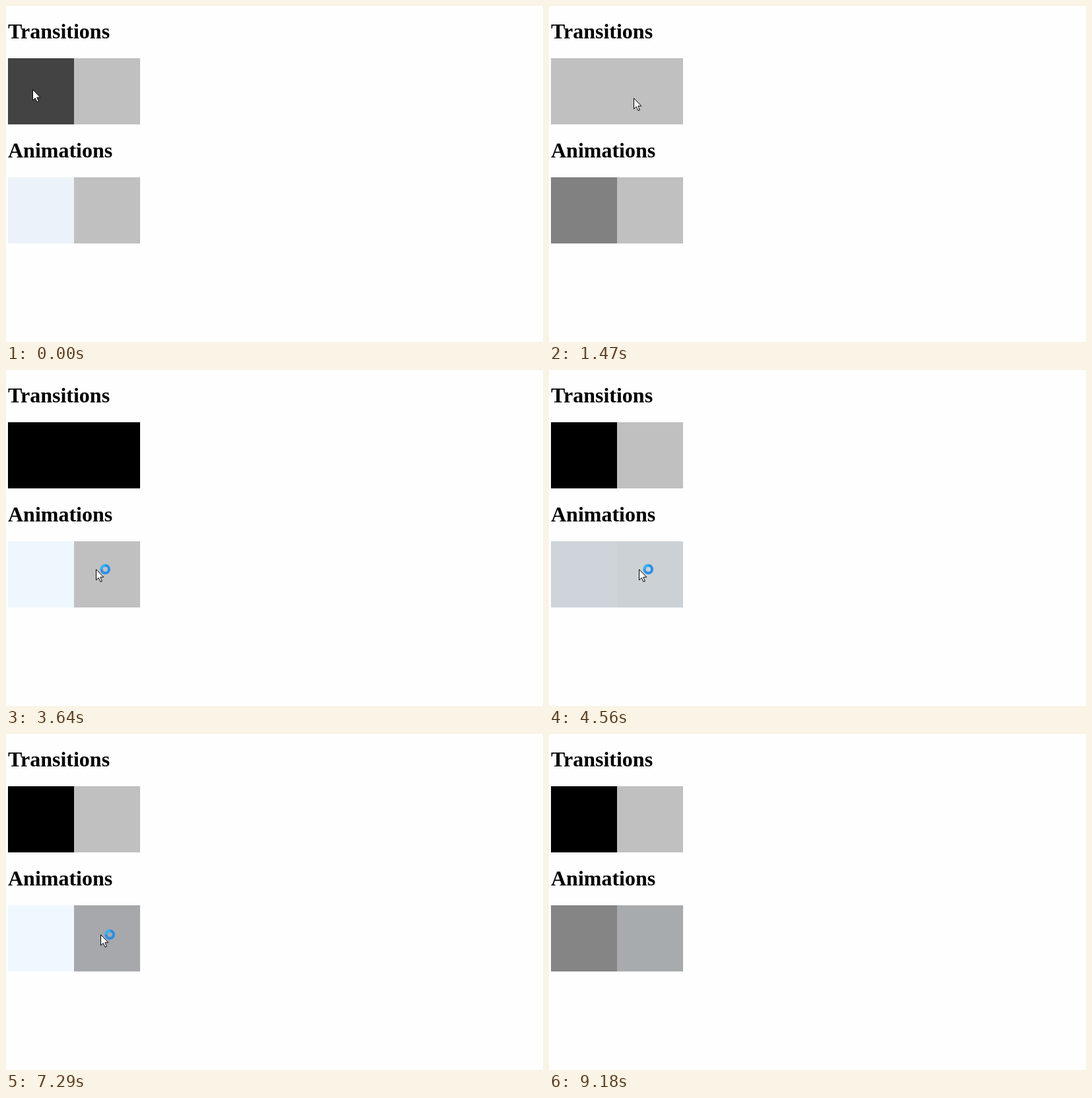
Write an HTML page that moves like this. It is 813 px wide and 508 px high and loops after 9480 ms.

```html
<!DOCTYPE html>
<html lang="en">
<head>
<meta charset="utf-8">
<title>Transitions and animations</title>
<style>
  html, body { margin: 0; width: 100%; height: 100%; overflow: hidden; background: #fefefe; }
  svg { display: block; }
  text { font: bold 32px "Liberation Serif", "Times New Roman", serif; }
</style>
</head>
<body>
<svg width="813" height="508">
  <text x="3" y="49">Transitions</text>
  <rect id="fade1" x="3" y="79" width="100" height="100"/>
  <rect id="fade2" x="103" y="79" width="100" height="100"/>
  <text x="3" y="229">Animations</text>
  <rect id="pulse1" x="3" y="259" width="100" height="100"/>
  <rect id="pulse2" x="103" y="259" width="100" height="100"/>
  <g id="cursor">
    <path d="M.5 .5V16.7L4.2 13.2 7 19.2 9.4 18.2 6.8 12.2H11.8Z" fill="#fff" stroke="#000"/>
    <g id="busy" fill="none" stroke-width="4">
      <circle cx="14.3" cy=".3" r="5.8" stroke="#2a8fe8"/>
      <path d="M8.5 .3A5.8 5.8 0 0 1 14.3 -5.5" stroke="#36b4f2"/>
    </g>
  </g>
</svg>
<script>
const LOOP = 9480, PULSE = 1965;
const BLACK = [0, 0, 0], SILVER = [192, 192, 192], GRAY = [128, 128, 128], ICE = [240, 248, 255];
// Spans in which the screen does not refresh
const stalls = [[1470, 1860], [2710, 3110], [4290, 4560], [5340, 5710], [7550, 8060], [9180, LOOP]];
// Pointer moves: start, duration, x, y
const moves = [[1200, 270, 128, 139], [3110, 400, 136, 301], [6770, 260, 143, 303], [8060, 860, 762, 520]];

const el = id => document.getElementById(id);
const clamp = v => Math.min(1, Math.max(0, v));
const mix = (a, b, k) => a + (b - a) * k;
const fill = (id, a, b, k) =>
  el(id).setAttribute("fill", `rgb(${a.map((v, i) => Math.round(mix(v, b[i], k)))})`);

// The CSS "ease" curve
function ease(x) {
  x = clamp(x);
  let lo = 0, hi = 1, s;
  for (let i = 0; i < 22; i++) {
    s = (lo + hi) / 2;
    const r = 1 - s;
    if (.75 * s * r * r + .75 * s * s * r + s ** 3 < x) lo = s; else hi = s;
  }
  return .3 * s * (1 - s) ** 2 + 3 * s * s * (1 - s) + s ** 3;
}

// Endless alternating ease, 0 at time 0
function pulse(t) {
  const phase = Math.abs(t / PULSE) % 2;
  return ease(1 - Math.abs(1 - phase));
}

function draw(time) {
  const stall = stalls.find(([from, to]) => time >= from && time < to);
  const t = stall ? stall[0] : time;

  const darken = 1 - ease((t - 1750) / 900);
  fill("fade1", BLACK, SILVER, t < 1700 ? ease((t + 222) / 1000) : darken);
  fill("fade2", BLACK, SILVER, t < 3700 ? darken : ease((t - 3700) / 600));

  const hovered = t - 3790, left = 8170 - 3790;
  fill("pulse1", GRAY, ICE, pulse(t - 1440));
  if (hovered < 0) fill("pulse2", SILVER, SILVER, 0);
  else fill("pulse2", GRAY, ICE, pulse(Math.min(hovered, left)));

  let x = 40, y = 126;
  for (const [start, span, toX, toY] of moves) {
    const k = clamp((t - start) / span);
    x = mix(x, toX, k);
    y = mix(y, toY, k);
  }
  el("cursor").setAttribute("transform", `translate(${Math.round(x)} ${Math.round(y)})`);
  el("busy").setAttribute("visibility", t > 3200 ? "visible" : "hidden");
}

const start = performance.now();
function loop() {
  draw((performance.now() - start) % LOOP);
  requestAnimationFrame(loop);
}
loop();
</script>
</body>
</html>
```
